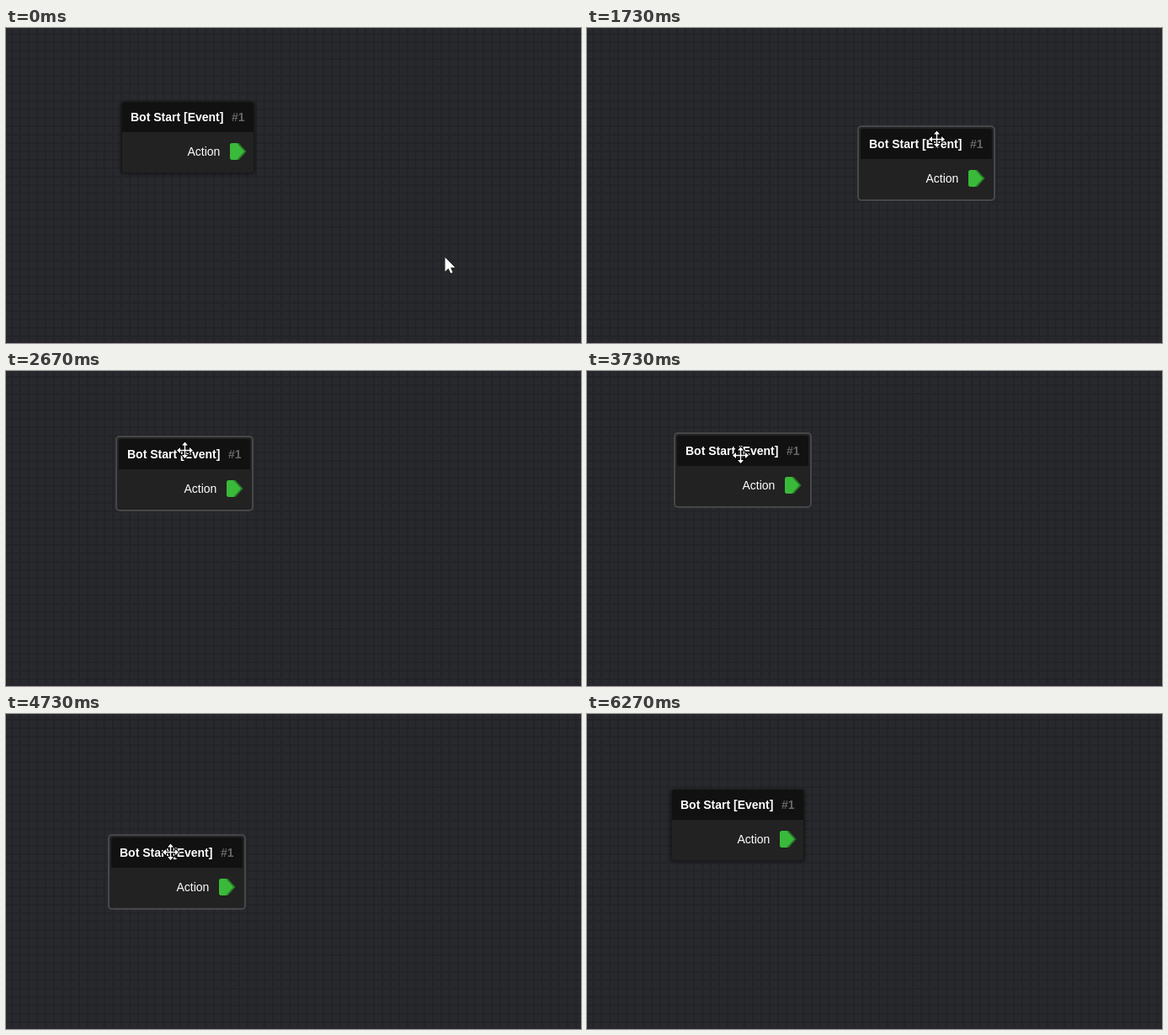
Recreate the animation shown at these times as an HTML page. Size 683 by 375 pixels, loop 7000 ms.

```html
<!DOCTYPE html>
<html lang="en">
<head>
<meta charset="utf-8">
<title>Node drag</title>
<style>
html, body { margin: 0; width: 100%; height: 100%; overflow: hidden; background: #28292d; }
svg { display: block; width: 683px; height: 375px; }
text { font: 14px "Liberation Sans", Arial, sans-serif; fill: #fff; }
.title { font-weight: bold; }
.id { fill: #666; }
</style>
</head>
<body>
<svg viewBox="0 0 683 375">
  <defs>
    <pattern id="grid" width="10" height="10" patternUnits="userSpaceOnUse">
      <rect width="10" height="10" fill="#28292d"/>
      <path d="M6 0h2v10h-2zM0 6h10v2h-10z" fill="#232427"/>
    </pattern>
    <filter id="blur" x="-10%" y="-15%" width="120%" height="130%"><feGaussianBlur stdDeviation="2"/></filter>
  </defs>
  <rect width="683" height="375" fill="url(#grid)"/>
  <rect y="373" width="683" height="2" fill="#2a2530"/>

  <g id="card">
    <rect id="shadow" x="-2" y="0" width="160" height="86" rx="4" fill-opacity=".5" filter="url(#blur)"/>
    <rect id="border" x="-3" y="-3" width="162" height="88" rx="4" fill="#222" stroke="#47474a" stroke-width="2"/>
    <rect width="156" height="84" rx="3" fill="#222"/>
    <path d="M0 36V3Q0 0 3 0H153Q156 0 156 3V36Z" fill="#111"/>
    <text class="title" x="10" y="23">Bot Start [Event]</text>
    <text class="title id" x="130" y="23">#1</text>
    <text x="77.5" y="64">Action</text>
    <path d="M131 49H138.500L147.500 59L138.500 69H131Q128 69 128 66V52Q128 49 131 49Z" fill="#2a7d2b"/>
    <path d="M131 49H136L145 59L136 69H131Q128 69 128 66V52Q128 49 131 49Z" fill="#3aba3a"/>
  </g>

  <path id="arrow" d="M-.5 0V17L3.500 13.200L6.200 19L8.700 18L6.100 12.200H11.500Z" fill="#fff" stroke="#000" paint-order="stroke"/>
  <g id="move" stroke="#000" stroke-width="2" paint-order="stroke">
    <path d="M.5-9.500L4-5.500H1.200V-.2H6V-3L10 .5L6 4V1.200H1.200V6H4L.5 10L-3 6H-.2V1.200H-5V4L-9 .5L-5-3V-.2H-.2V-5.500H-3Z"
      fill="#fff" paint-order="stroke"/>
  </g>
</svg>
<script>
const LOOP = 7000, STEP = 1000 / 15;
const el = id => document.getElementById(id);
const card = el('card'), border = el('border'), shadow = el('shadow');
const arrow = el('arrow'), move = el('move');

// Turning points of the drag: [step, x, y].
const turns = [
  [17, 138, 88], [19, 153, 73], [21, 212, 59], [25, 317, 104], [27, 324, 139], [31, 218, 217],
  [32, 178, 207], [38, 101, 78], [46, 309, 100], [49, 206, 93], [56, 107, 77], [61, 229, 45],
  [64, 278, 103], [68, 228, 178], [71, 125, 147], [74, 101, 90]
];
// Pointer position within the card during the drag.
const grip = [[17, 78, 18], [19, 96, 16], [32, 83, 10], [56, 75, 23], [64, 77, 29], [71, 70, 17]];

const START = [522, 273], HEADER = [249, 100], GRAB = [216, 106], REST = [171, 107], ASIDE = [389, 204];

const clamp01 = v => Math.min(1, Math.max(0, v));
const ease = u => u * u * (3 - 2 * u);
const progress = (k, from, to) => clamp01((k - from) / (to - from));
const mix = (a, b, u) => a.map((v, i) => v + (b[i] - v) * u);

// Smooth curve through the rows that turns exactly at their extremes.
function along(rows, k) {
  const last = rows.length - 1;
  if (k <= rows[0][0]) return rows[0].slice(1);
  if (k >= rows[last][0]) return rows[last].slice(1);
  const i = rows.findIndex(r => r[0] > k) - 1;
  const a = rows[i], b = rows[i + 1], span = b[0] - a[0], u = (k - a[0]) / span;
  const slope = (j, c) => {
    const p = rows[Math.max(0, j - 1)], n = rows[Math.min(last, j + 1)];
    const before = rows[j][c] - p[c], after = n[c] - rows[j][c];
    return before * after <= 0 ? 0 : (n[c] - p[c]) / (n[0] - p[0]);
  };
  return [1, 2].map(c => {
    const ma = slope(i, c) * span, mb = slope(i + 1, c) * span, d = b[c] - a[c];
    return a[c] + u * (ma + u * (3 * d - 2 * ma - mb + u * (ma + mb - 2 * d)));
  });
}

function pointer(k, pos) {
  if (k < 8) return mix(START, HEADER, ease(progress(k, 0, 5)));
  if (k < 17) return mix(HEADER, GRAB, progress(k, 8, 14));
  if (k < 78) return along(grip, k).map((g, i) => pos[i] + g);
  if (k < 85) return mix(REST, ASIDE, ease(progress(k, 78, 83)));
  const u = progress(k, 84, 94);
  return [ASIDE[0] - 349 * u, ASIDE[1] - 70 * u + 256 * u * u];
}

function place(node, [x, y]) {
  node.setAttribute('transform', `translate(${Math.round(x)} ${Math.round(y)})`);
}

function draw(t) {
  const k = Math.floor((t + 5) / STEP);
  const pos = along(turns, k);
  const lit = progress(k, 8, 14) - progress(k, 79, 83);
  place(card, pos);
  border.setAttribute('opacity', lit);
  shadow.setAttribute('opacity', 1 - lit);

  const grabbing = k >= 4 && k < 80;
  place(grabbing ? move : arrow, pointer(k, pos));
  move.style.display = grabbing ? '' : 'none';
  arrow.style.display = grabbing || k >= 94 ? 'none' : '';
}

function tick() {
  draw(performance.now() % LOOP);
  requestAnimationFrame(tick);
}
tick();
</script>
</body>
</html>
```
